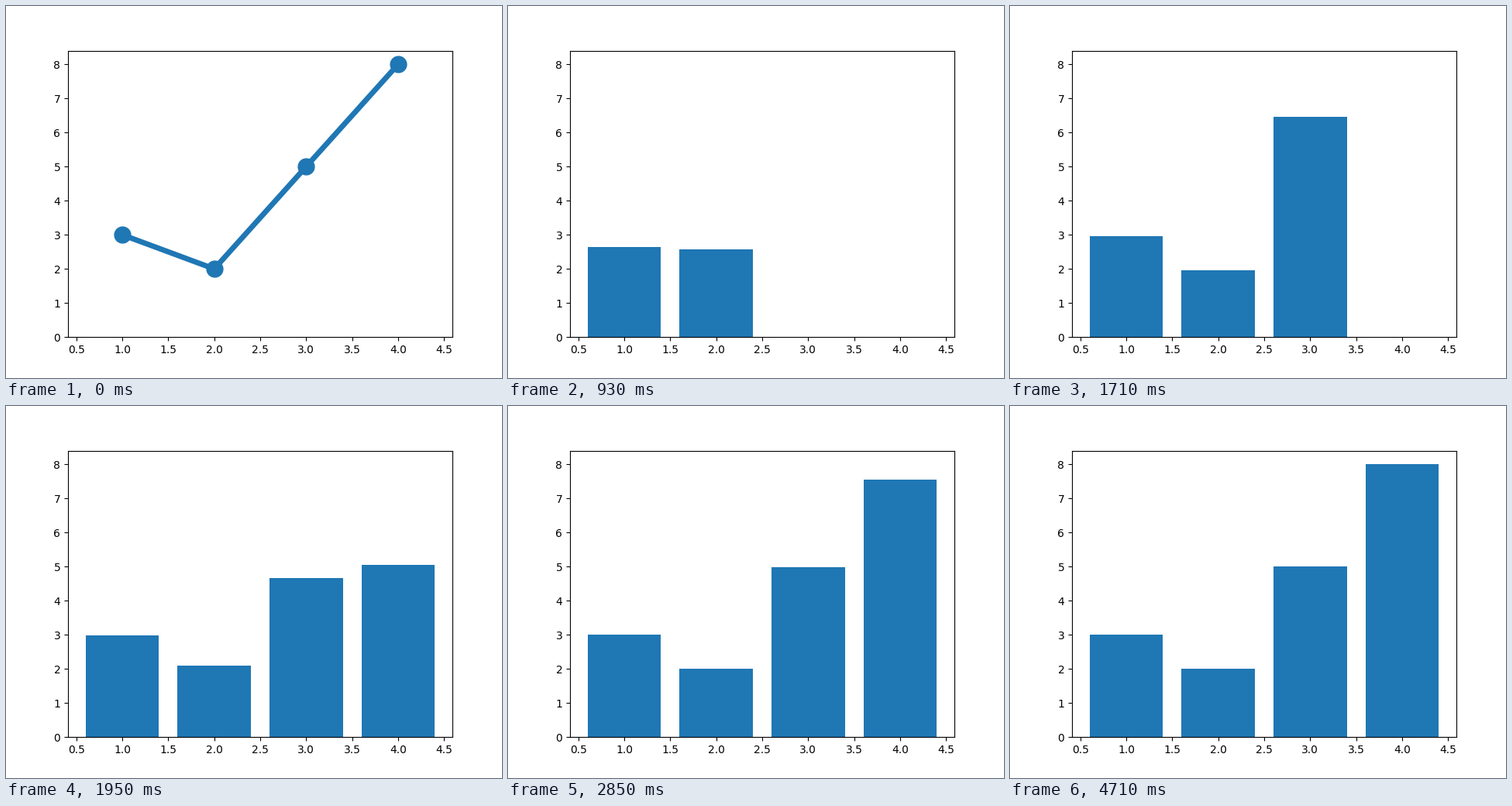
Write a matplotlib script that moves like this. It is 640 px wide and 480 px high and loops after 9000 ms.

```python
import numpy as np
import matplotlib.pyplot as plt
from matplotlib.animation import FuncAnimation

FRAMES, INTERVAL = 300, 30
RISE, STAGGER = 100, 20  # in frames

x = np.array([1, 2, 3, 4])
y = np.array([3, 2, 5, 8])


def elastic_out(t):
    t = np.clip(t, 0, 1)
    return 1 + np.sin(-6.5 * np.pi * (t + 1)) * 2.0 ** (-10 * t)


fig, ax = plt.subplots(figsize=(6.4, 4.8), dpi=100)
bars = ax.bar(x, np.zeros(len(x)), color="C0")
line, = ax.plot(x, y, "o-", color="C0", lw=5, ms=15)
ax.set_xlim(0.41, 4.59)
ax.set_ylim(0, 8.4)


def update(frame):
    line.set_visible(frame == 0)
    t = (frame - STAGGER * np.arange(len(x))) / RISE
    for bar, height in zip(bars, y * elastic_out(t)):
        bar.set_height(height)
    return [line, *bars]


anim = FuncAnimation(fig, update, frames=FRAMES, interval=INTERVAL,
                     repeat=True, repeat_delay=0, blit=False)
plt.show()
```
